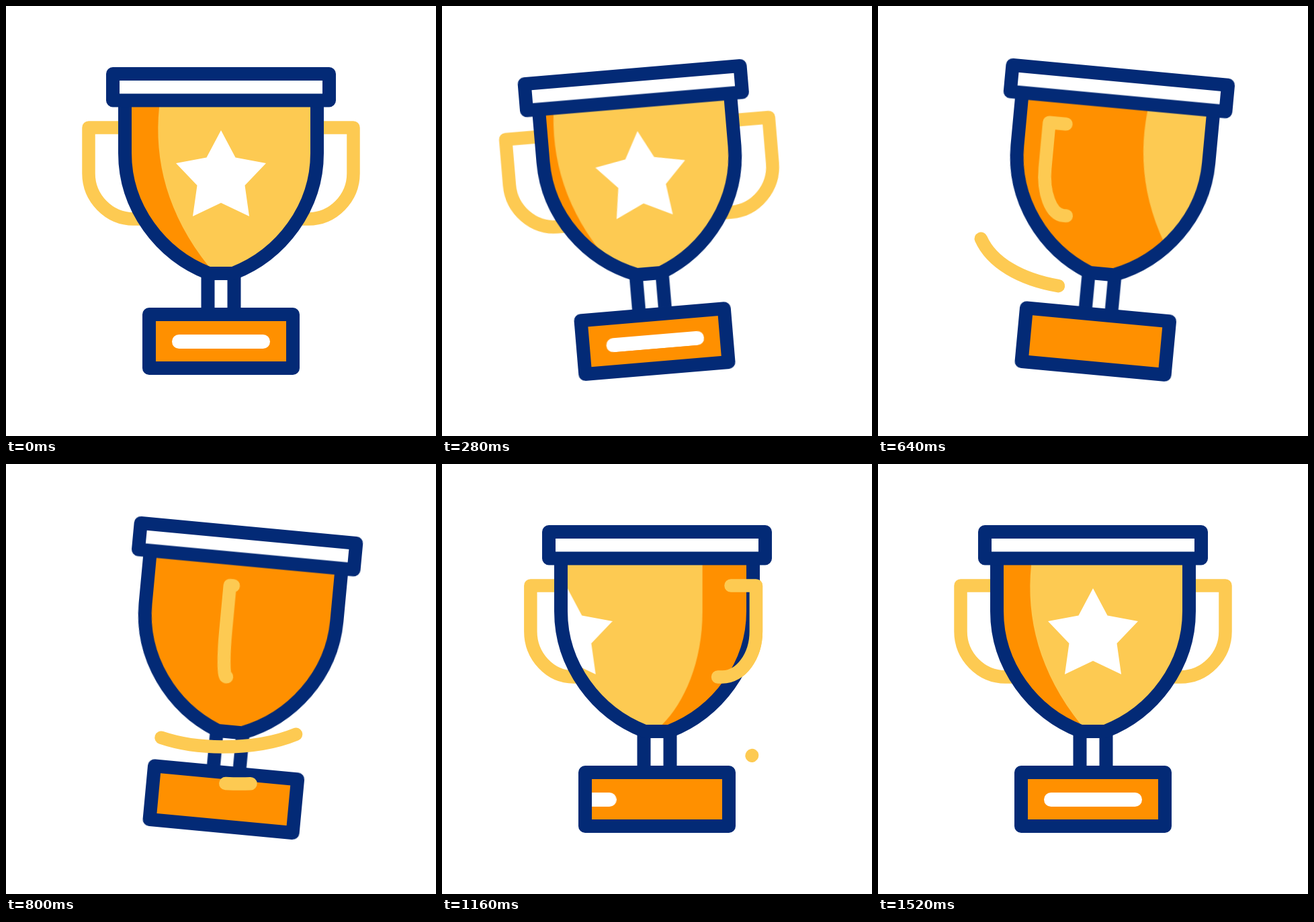
Write an HTML page without scripts that moves like this. It is 640 px wide and 640 px high and loops after 1800 ms.

```html
<!DOCTYPE html>
<html lang="en">
<head>
<meta charset="utf-8">
<title>Spinning trophy</title>
<style>
  :root {
    --navy: #032a76;
    --gold: #fdca52;
    --orange: #ff9000;
  }
  html, body { margin: 0; width: 100%; height: 100%; overflow: hidden; background: #fff; }
  svg { display: block; width: 100%; height: 100%; }
  svg * { animation: 1.8s linear infinite; }

  .line { fill: none; stroke: var(--navy); stroke-width: 20; stroke-linejoin: round; }
  .gold { fill: none; stroke: var(--gold); stroke-width: 19.5; stroke-linecap: round; stroke-linejoin: round; }
  .slot { fill: none; stroke: #fff; stroke-width: 21; stroke-linecap: round; }

  .trophy { transform-origin: 320px 540px; animation-name: tilt; }
  .mark { animation-name: slide; }
  .shade { fill: var(--orange); animation-name: shade; }
  .near { animation-name: near; }
  .near.over { animation-name: near, over; animation-timing-function: linear, step-end; }
  .far { animation-name: far; }
  .swoosh1 { animation-name: swoosh1, show1; animation-timing-function: linear, step-end; }
  .swoosh2 { animation-name: swoosh2, show2; animation-timing-function: linear, step-end; }

  @keyframes tilt {
    0% { transform: rotate(0deg); animation-timing-function: cubic-bezier(.37, 0, .63, 1); }
    14.8% { transform: rotate(-5deg); animation-timing-function: cubic-bezier(.25, .1, .2, 1); }
    41.4% { transform: rotate(5.6deg); animation-timing-function: cubic-bezier(.37, 0, .63, 1); }
    64.4%, 100% { transform: rotate(0deg); }
  }

  /* Star and plate slot leave on the right and return from the left */
  @keyframes slide {
    0%, 15.4% { transform: translateX(0); animation-timing-function: cubic-bezier(.35, .1, .7, .75); }
    26.67% { transform: translateX(119px); }
    34.5% { transform: translateX(210px); }
    34.51%, 55.5% { transform: translateX(-215px); }
    64.44% { transform: translateX(-134px); animation-timing-function: cubic-bezier(.3, .5, .6, 1); }
    84.4%, 100% { transform: translateX(0); }
  }

  @keyframes shade {
    0% { transform: translateX(0); animation-timing-function: cubic-bezier(.37, 0, .63, 1); }
    11.1% { transform: translateX(-36px); }
    15.56% { transform: translateX(-30px); animation-timing-function: cubic-bezier(.35, .15, .7, .75); }
    26.67% { transform: translateX(46px); }
    44.44% { transform: translateX(227px); }
    55.56% { transform: translateX(342px); }
    64.44% { transform: translateX(434px); }
    72.2% { transform: translateX(514px); }
    72.21% { transform: translateX(-60px); animation-timing-function: cubic-bezier(.3, .5, .6, 1); }
    84.4%, 100% { transform: translateX(0); }
  }

  /* Handles swap sides, one in front of the cup and one behind it */
  @keyframes near {
    0%, 13.33% { d: path("M173 181H123V249C123 286 153 317 190 317H199"); animation-timing-function: cubic-bezier(.37, 0, .63, 1); }
    80%, 100% { d: path("M467 181H517V249C517 286 487 317 450 317H441"); }
  }
  @keyframes far {
    0%, 16.4% { d: path("M467 181H517V249C517 286 487 317 450 317H441"); animation-timing-function: cubic-bezier(.42, 0, .56, 1); }
    70.5%, 100% { d: path("M173 181H123V249C123 286 153 317 190 317H199"); }
  }
  @keyframes over {
    0% { visibility: hidden; }
    16.7% { visibility: visible; }
    76.7%, 100% { visibility: hidden; }
  }

  /* Dash length is the visible part, negative offset is its start */
  @keyframes swoosh1 {
    0%, 26.6% { stroke-dasharray: .01 300; stroke-dashoffset: 0; }
    35.5% { stroke-dasharray: 33 300; stroke-dashoffset: -4; }
    44.44% { stroke-dasharray: 48.5 300; stroke-dashoffset: -28; }
    53.3% { stroke-dasharray: 22 300; stroke-dashoffset: -78; }
    55.56% { stroke-dasharray: 10.4 300; stroke-dashoffset: -89.5; }
    58.5%, 100% { stroke-dasharray: .01 300; stroke-dashoffset: -99.9; }
  }
  @keyframes show1 {
    0% { visibility: hidden; }
    26.5% { visibility: visible; }
    59.5%, 100% { visibility: hidden; }
  }
  @keyframes swoosh2 {
    0%, 39.5% { stroke-dasharray: .01 300; stroke-dashoffset: 0; }
    44.44% { stroke-dasharray: 24 300; stroke-dashoffset: -4; }
    55.56% { stroke-dasharray: 43 300; stroke-dashoffset: -50; }
    58% { stroke-dasharray: 35 300; stroke-dashoffset: -64; }
    64.44%, 100% { stroke-dasharray: .5 300; stroke-dashoffset: -99; }
  }
  @keyframes show2 {
    0% { visibility: hidden; }
    39.5% { visibility: visible; }
    66.4%, 100% { visibility: hidden; }
  }
</style>
</head>
<body>
<svg viewBox="0 0 640 640">
  <defs>
    <path id="bowl" d="M177 140V219C177 300 230 370 302 398H338C410 370 463 300 463 219V140Z"/>
    <rect id="base" x="213" y="459" width="214" height="80"/>
    <clipPath id="inBowl"><use href="#bowl"/></clipPath>
    <clipPath id="inBase"><use href="#base"/></clipPath>
  </defs>

  <g class="trophy">
    <path class="gold far" d="M467 181H517V249C517 286 487 317 450 317H441"/>
    <path class="gold near" d="M173 181H123V249C123 286 153 317 190 317H199"/>

    <g clip-path="url(#inBowl)">
      <use href="#bowl" fill="#fdca52"/>
      <path class="shade" d="M228 140V151C220 230 240 310 302 388L312 400H-119L-107 388C-74 355 -47 295 -47 220V140Z"/>
      <path class="mark" fill="#fff" d="M320 185L341.500 225.500L387 234L355.500 267L362 313L320 293L278 313L284.500 267L253 234L298.500 225.500Z"/>
    </g>
    <path class="line" d="M300.500 398V459M339.500 398V459"/>
    <use href="#bowl" class="line"/>
    <rect class="line" style="fill: #fff" x="159" y="101" width="322" height="39.500"/>

    <use href="#base" fill="#ff9000"/>
    <g clip-path="url(#inBase)">
      <path class="slot mark" d="M257.500 499.500H382.500"/>
    </g>
    <use href="#base" class="line"/>

    <path class="gold near over" d="M173 181H123V249C123 286 153 317 190 317H199"/>
  </g>

  <path class="gold swoosh1" pathLength="100" d="M148 329C158 385 230 421 322 421C414 421 488 390 495 333"/>
  <path class="gold swoosh2" pathLength="100" d="M320 475C390 480 437 468 462 433"/>
</svg>
</body>
</html>
```
